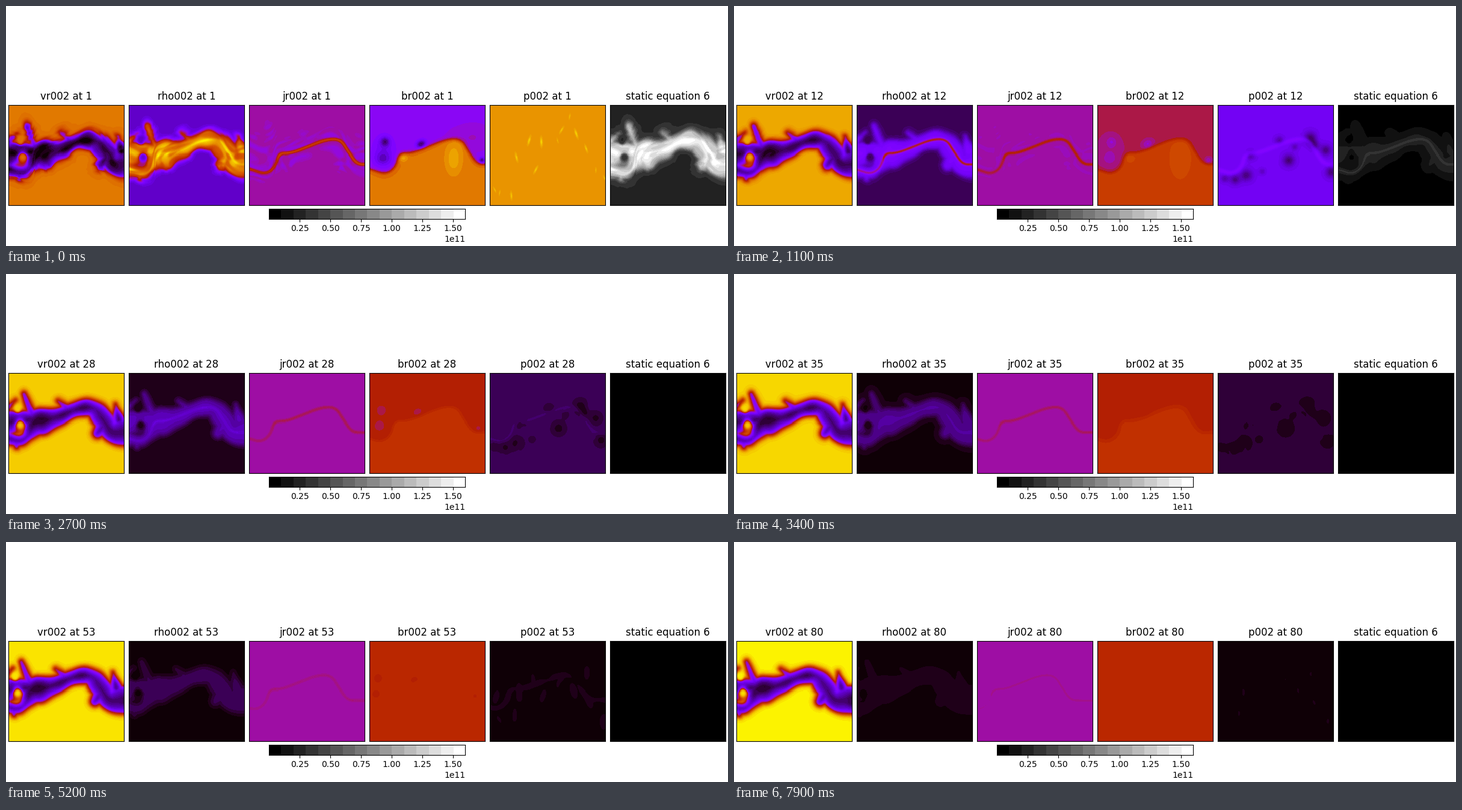
A matplotlib script for the animation above (8000 ms loop, 1200 by 400 pixels).

```python
import numpy as np
import matplotlib.pyplot as plt
from matplotlib.animation import FuncAnimation

W, H, PAD = 192, 167, 14
FRAMES = 80
STEP = 1 / 54
rng = np.random.default_rng(4)

X, Y = np.meshgrid(np.arange(240) - PAD + 0.5, np.arange(H) + 0.5)

# Centre line of the plasma sheet with its half width, and plumes off it
SPINE = [(-25, 100, 18), (4, 109, 11), (24, 115, 9), (40, 104, 10),
         (46, 81, 23), (66, 81, 20), (90, 72, 15), (125, 58, 13),
         (149, 58, 14), (162, 79, 18), (176, 99, 16), (194, 99, 24),
         (245, 100, 24)]
PLUMES = [[(46, 78, 16), (0, 84, 20)], [(44, 70, 9), (30, 36, 3)],
          [(-4, 66, 6), (16, 46, 3)], [(188, 80, 10), (183, 53, 2)],
          [(104, 62, 9), (87, 48, 3)], [(18, 112, 9), (18, 123, 4)],
          [(165, 85, 14), (152, 101, 8)]]


def smooth_curve(points, rounds=4):
    p = np.array(points, float)
    for _ in range(rounds):
        q = np.repeat(p, 2, axis=0)
        q[1:-1:2] = .75 * p[:-1] + .25 * p[1:]
        q[2::2] = .25 * p[:-1] + .75 * p[1:]
        p = q
    return p


def brush(points):
    return np.max([r - np.hypot(X - x, Y - y) for x, y, r in points], axis=0)


def blur(f, times):
    for _ in range(times):
        p = np.pad(f, 1, mode="edge")
        f = (p[1:-1, :-2] + p[1:-1, 2:] + p[:-2, 1:-1] + p[2:, 1:-1]
             + 2 * f) / 6
    return f


def blob(x, y, w, h, tilt=0):
    u = (X - x) * np.cos(tilt) + (Y - y) * np.sin(tilt)
    v = (Y - y) * np.cos(tilt) - (X - x) * np.sin(tilt)
    return np.exp(-(u / w) ** 2 - (v / h) ** 2)


def scatter(count, w, h, spread):
    """Tilted spots strewn around the centre line."""
    total = np.zeros_like(X)
    for x in np.linspace(5, 190, count) + rng.normal(0, 5, count):
        y = np.interp(x, curve[:, 0], curve[:, 1]) + rng.normal(0, spread)
        size = rng.uniform(.6, 1.2)
        total += size * blob(x, y, w * size, h * size, rng.uniform(-.6, .6))
    return total


def noise(low, high, x, y, modes=26):
    total = np.zeros_like(X)
    for _ in range(modes):
        k, a, phase = rng.uniform([low, 0, 0], [high, np.pi, 2 * np.pi])
        total += np.cos(k * (np.cos(a) * x + np.sin(a) * y) + phase)
    return total / np.sqrt(modes / 2)


curve = smooth_curve(SPINE)
depth = brush(curve)
for ends in PLUMES:
    depth = np.maximum(depth, brush(np.linspace(*ends, 40)))
depth = blur(depth, 4) - 22 * blob(24, 85, 9, 9) - 12 * blob(20, 61, 5, 6)

level = np.interp(X, curve[:, 0], curve[:, 1])
gap = -brush([(x, y, 0) for x, y, _ in curve])
side = blur(np.tanh(gap * np.sign(Y - level) / 3), 2)
strand = np.exp(-(gap / 2.6) ** 2) * np.where(X < 44, .7, 1)
halo = np.exp(-(gap / 4) ** 2)

warp = noise(.04, .1, X, Y)
fibre = noise(.15, .6, .35 * X + 9 * warp, Y - level + 7 * warp)
fibre = .5 + .5 * np.tanh(fibre)
ripple = noise(.08, .2, X, Y)

# Magnetic islands above the line, knots and crest below it
islands = (.1 * blob(56, 88, 8, 7) + .1 * blob(140, 90, 15, 28)
           + .05 * blob(172, 55, 25, 18) - .1 * blob(24, 78, 20, 27)
           - .17 * blob(26, 62, 8, 8) - .1 * blob(22, 90, 12, 10)
           - .24 * blob(86, 66, 9, 7, -.5) - .22 * blob(187, 92, 5, 5))
voids = scatter(12, 9, 9, 16)
crests = scatter(12, 3.5, 8, 22)
sparks = scatter(14, 1.6, 6, 28)


def shift(f, dx):
    i = int(np.floor(PAD + dx))
    k = PAD + dx - i
    return f[:, i:i + W] * (1 - k) + f[:, i + 1:i + W + 1] * k


def fade(t, rate):
    return np.exp(-rate * t ** .75)


def banded(x, step=STEP, origin=0):
    x = origin + step * np.round((x - origin) / step)
    return np.clip(x, 1.01 / 255, 1)


def fields(t):
    drift, flow, eddy = .17 * t, .3 * (t - 11), .22 * (t - 42)
    rough = np.exp(-t / 8)
    late = 1 - np.exp(-t / 3)
    hair, wave = shift(fibre, drift), shift(ripple, drift)
    line = shift(strand, flow)

    s = shift(depth, drift) + (.5 + rough) * wave + 3 * rough * (hair - .5)
    edge = 1 / (1 + np.exp(-np.clip(s / 2.5, -30, 30)))
    sheet = edge * (.8 + .16 * np.clip(s / 18, 0, 1) + .01 * wave)

    vr = (1 - .23 * fade(t, .097)) * (1 - sheet * (1 + rough * (.1 - .1 * hair)))

    rho = (.148 * np.exp(-.085 * t)
           + (.57 * np.exp(-t / 3) + .27 * np.exp(-.029 * t))
           * sheet * (1 - .25 * rough * hair)
           + .25 * np.exp(-((t - 11) / 11) ** 2) * line)

    jr = (21 * STEP + .24 * fade(t, .108) * line
          - .06 * rough * edge * hair * (1 - line))

    br = 29 * STEP + fade(t, .152) * (.23 * shift(side, flow)
                                      + shift(islands, .22 * t))

    base = .833 * fade(t, .236)
    p = (base * (1 + late * (.35 * shift(halo, flow)
                             - .55 * shift(voids, eddy)))
         + .009 * late * shift(crests, eddy)
         + .09 * np.exp(-t / 4) * shift(sparks, .22 * t))

    static = np.round(rho * 16.5 * np.exp(-.082 * t)) / 15
    return [banded(vr), banded(rho), banded(jr),
            banded(br, .0405, 29 * STEP), banded(p), np.clip(static, 0, 1)]


def add_axes(x, y, w, h):
    return fig.add_axes([x / 1200, y / 400, w / 1200, h / 400])


NAMES = ["vr002", "rho002", "jr002", "br002", "p002"]
fig = plt.figure(figsize=(12, 4), dpi=100, facecolor="white")
axes = [add_axes(4 + 200 * i, 68, W, 167.4) for i in range(6)]
images = []
for i, ax in enumerate(axes):
    ax.set(xticks=[], yticks=[])
    images.append(ax.imshow(np.zeros((H, W)), vmin=0, vmax=1, aspect="auto",
                            cmap="gnuplot" if i < 5 else "gray",
                            interpolation="nearest"))
axes[5].set_title("static equation 6")

bar = add_axes(437, 45.4, 326.4, 17)
bar.imshow(np.arange(16)[None, :], cmap="gray", aspect="auto",
           interpolation="nearest", extent=(0, 1.6e11, 0, 1))
bar.set(yticks=[], xticks=np.arange(1, 7) * .25e11)


def update(t):
    for image, data in zip(images, fields(t)):
        image.set_data(data)
    for ax, name in zip(axes, NAMES):
        ax.set_title(f"{name} at {t + 1}")
    return images


anim = FuncAnimation(fig, update, frames=FRAMES, interval=100, repeat=True,
                     repeat_delay=0, blit=False)
plt.show()
```
